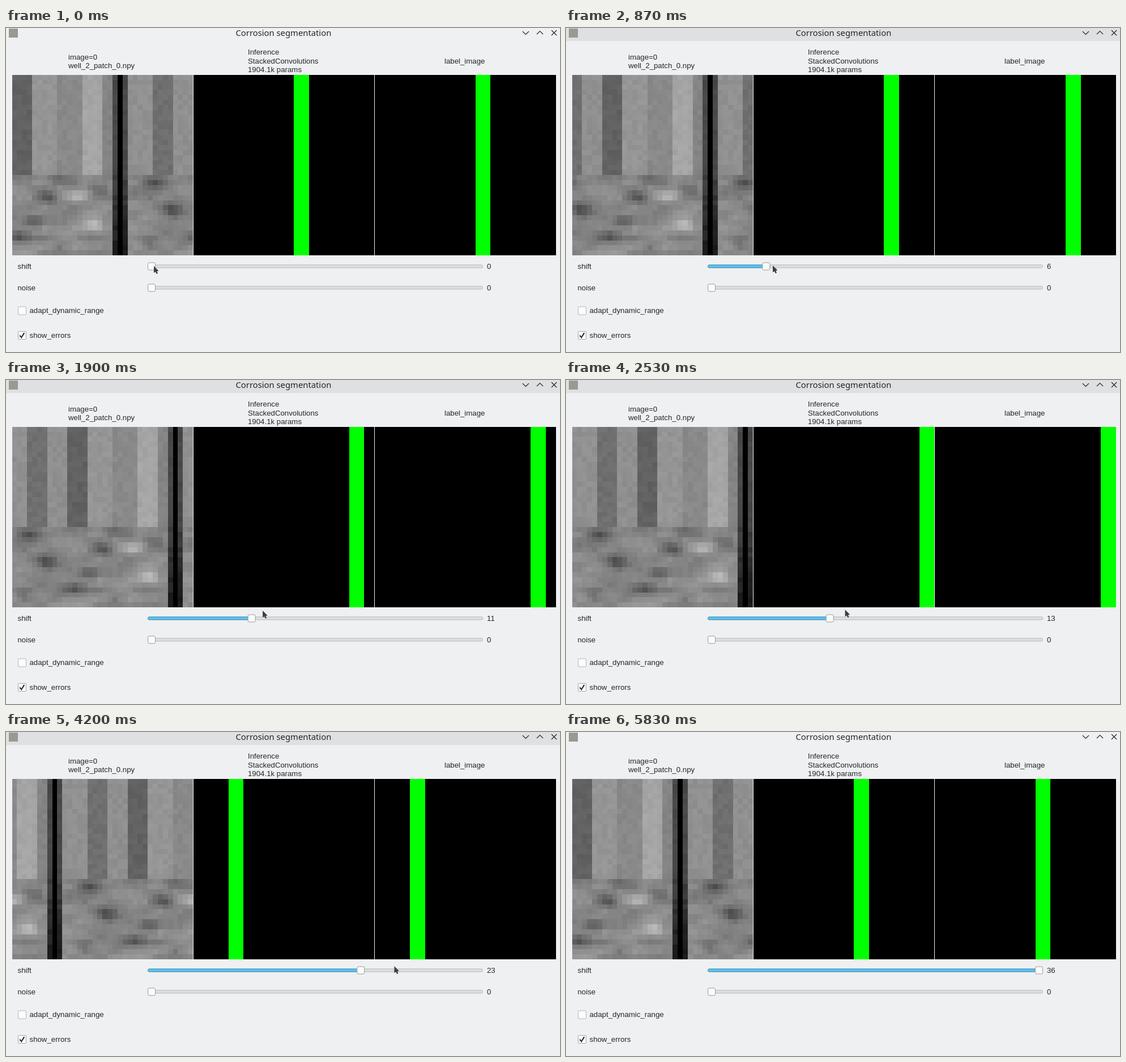
Recreate the animation shown at these times as an HTML page with a canvas. Size 978 by 573 pixels, loop 5910 ms.

```html
<!DOCTYPE html>
<html lang="en">
<head>
<meta charset="utf-8">
<title>Corrosion segmentation</title>
<style>
html, body { margin: 0; width: 100%; height: 100%; overflow: hidden; background: #eff0f1; }
canvas { display: block; }
</style>
</head>
<body>
<canvas id="stage" width="978" height="573"></canvas>
<script>
const ctx = document.getElementById('stage').getContext('2d');
const LOOP = 5910, N = 36, TOP = 82.7, SIZE = 319.5;
const LAG = 100, RELEASE = 4900, STEP = 578 / N;
const BG = '#eff0f1', INK = '#232629';
const SANS = '13.25px "Liberation Sans", Arial, sans-serif';

// Pointer path: time, x, y
const path = [
  [270, 261, 421], [620, 350, 421], [870, 365, 420],
  [1130, 365, 420], [1640, 446, 410], [1900, 453, 408], [2100, 474, 407],
  [2330, 474, 407], [2600, 499, 406],
  [3763, 499, 406], [4200, 685, 414], [4330, 744, 421],
  [4400, 744, 421], [4500, 832, 426], [4600, 866, 428],
  [5000, 866, 428], [5300, 24, -61]
];

function pointerAt(t) {
  const i = path.findIndex(p => p[0] > t);
  if (i === 0) return path[0].slice(1);
  if (i < 0) return path[path.length - 1].slice(1);
  const [t0, x0, y0] = path[i - 1], [t1, x1, y1] = path[i];
  const p = (t - t0) / (t1 - t0);
  return [x0 + (x1 - x0) * p, y0 + (y1 - y0) * p];
}

// The slider trails the pointer until the button is released
function shiftAt(t) {
  const [x] = pointerAt(Math.min(t - LAG, RELEASE));
  return Math.min(N, Math.floor((x - path[0][1]) / STEP));
}

function rand(x, y) {
  const s = Math.sin(x * 127.1 + y * 311.7 + 7.3) * 43758.5453;
  return s - Math.floor(s);
}

const mix = (a, b, f) => a + (b - a) * f;

function smoothNoise(c, r) {
  const u = c / 3, v = r / 1.6;
  const i = Math.floor(u), j = Math.floor(v);
  const at = (p, q) => rand(p % 12 + 40, q + 60);
  const row = q => mix(at(i, q), at(i + 1, q), u - i);
  return mix(row(j), row(j + 1), v - j);
}

// Upper stripes: width in cells, grey level
const columns = [
  [4, 97], [5, 149], [5, 137], [4, 165], [2, 132], [1, 72],
  [1, 0], [1, 72], [5, 144], [4, 111], [4, 143]
].flatMap(([w, v]) => Array(w).fill(v));

// Soft spots of the lower part: column, row, change of grey
const spots = [
  [9, 20.5, -30], [28, 21, -45], [16.5, 22.5, -30], [6.5, 24, -50],
  [13, 23.5, 45], [31.5, 26.5, -55], [26.5, 27.8, 30], [4, 28.5, -40],
  [15.8, 29.3, 75], [0.8, 31.5, -45]
];

function grey(c, r) {
  const jitter = rand(c, r) - 0.5, base = columns[c];
  if (base === 0) return 0;
  if (r < 20) return base + jitter * 11;
  if (base < 80) return mix(60, 28, (r - 20) / 16) + jitter * 20;
  let v = 115 + 40 * smoothNoise(c, r) + jitter * 10;
  for (const [sc, sr, d] of spots) {
    const dx = (c - sc + 1.5 * N) % N - N / 2, dy = r - sr;
    v += d * Math.exp(-(dx * dx / 5) - dy * dy / 1.8);
  }
  return v;
}

function tile(paint) {
  const g = Object.assign(document.createElement('canvas'), { width: N, height: N }).getContext('2d');
  paint(g);
  return g;
}

const texture = tile(g => {
  for (let r = 0; r < N; r++) {
    for (let c = 0; c < N; c++) {
      const v = Math.round(grey(c, r));
      g.fillStyle = `rgb(${v},${v},${v})`;
      g.fillRect(c, r, 1, 1);
    }
  }
});
const mask = tile(g => {
  g.fillRect(0, 0, N, N);
  g.fillStyle = '#0f0';
  g.fillRect(20, 0, 3, N);
});
const rolled = tile(() => {});
ctx.imageSmoothingEnabled = false;

function panel(source, left, shift) {
  rolled.drawImage(source.canvas, shift, 0);
  rolled.drawImage(source.canvas, shift - N, 0);
  ctx.drawImage(rolled.canvas, left, TOP, SIZE, SIZE);
}

function rect(x, y, w, h, fill) {
  ctx.fillStyle = fill;
  ctx.fillRect(x, y, w, h);
}

function box(x, y, w, h, radius, fill, stroke) {
  ctx.beginPath();
  ctx.roundRect(x, y, w, h, radius);
  ctx.fillStyle = fill;
  ctx.fill();
  ctx.strokeStyle = stroke;
  ctx.lineWidth = 1;
  ctx.stroke();
}

function line(points, width) {
  ctx.beginPath();
  points.forEach(([x, y]) => ctx.lineTo(x, y));
  ctx.strokeStyle = INK;
  ctx.lineWidth = width;
  ctx.stroke();
}

function text(str, x, y, font = SANS) {
  ctx.font = font;
  ctx.fillStyle = INK;
  ctx.fillText(str, x, y);
}

function lines(rows, x, y) {
  rows.forEach((row, i) => text(row, x, y + i * 15.5));
}

function titleBar(active) {
  rect(0, 0, 978, 23, active ? '#dee0e2' : BG);
  rect(5, 1, 16, 16, '#9b9893');
  text('Corrosion segmentation', 405.5, 14, '14.8px "Noto Sans", sans-serif');
  line([[912, 6], [917.5, 11.5], [923, 6]], 1.2);
  line([[937, 11], [942.5, 5.5], [948, 11]], 1.2);
  line([[963, 4], [972, 13]], 1.2);
  line([[972, 4], [963, 13]], 1.2);
}

function slider(label, y, value) {
  const x = 257 + value * STEP;
  text(label, 20.5, y + 4.5);
  box(250.5, y - 2.5, 591, 5, 2.5, '#dfe0e2', '#b3b5b7');
  if (value) box(250.5, y - 2.5, x - 250.5, 5, 2.5, '#5fbff0', '#3391c4');
  box(x - 6.5, y - 6.5, 13, 13, 2.5, '#fcfcfc', '#97999b');
  text(value, 849, y + 4.5);
}

function checkBox(label, y, checked) {
  box(21.5, y - 7, 14, 14, 1, '#fcfcfc', checked ? '#a2a4a6' : '#b5b7b9');
  if (checked) line([[24.3, y + 0.2], [27.2, y + 3.8], [32.3, y - 4.4]], 2);
  text(label, 41.5, y + 4);
}

function pointer(x, y) {
  ctx.beginPath();
  [[0, 0], [0, 12], [3, 10.2], [4.8, 14], [7, 13], [5.4, 9.3], [8.5, 8.6]]
    .forEach(([dx, dy]) => ctx.lineTo(x + dx, y + dy));
  ctx.closePath();
  ctx.strokeStyle = 'rgba(250,250,250,0.5)';
  ctx.lineWidth = 1;
  ctx.stroke();
  ctx.fillStyle = '#3b3f44';
  ctx.fill();
}

function draw(t) {
  const shift = shiftAt(t);
  rect(0, 0, 978, 573, BG);
  titleBar(t >= 270 && t < 5830);
  lines(['image=0', 'well_2_patch_0.npy'], 110, 55.6);
  lines(['Inference', 'StackedConvolutions', '1904.1k params'], 427, 47.2);
  text('label_image', 774, 63);
  panel(texture, 10.6, shift);
  panel(mask, 330.7, shift);
  panel(mask, 651.3, shift);
  slider('shift', 421.5, shift);
  slider('noise', 459.4, 0);
  checkBox('adapt_dynamic_range', 500, false);
  checkBox('show_errors', 543.5, true);
  pointer(...pointerAt(t));
}

function frame() {
  draw(performance.now() % LOOP);
  requestAnimationFrame(frame);
}
frame();
</script>
</body>
</html>
```
